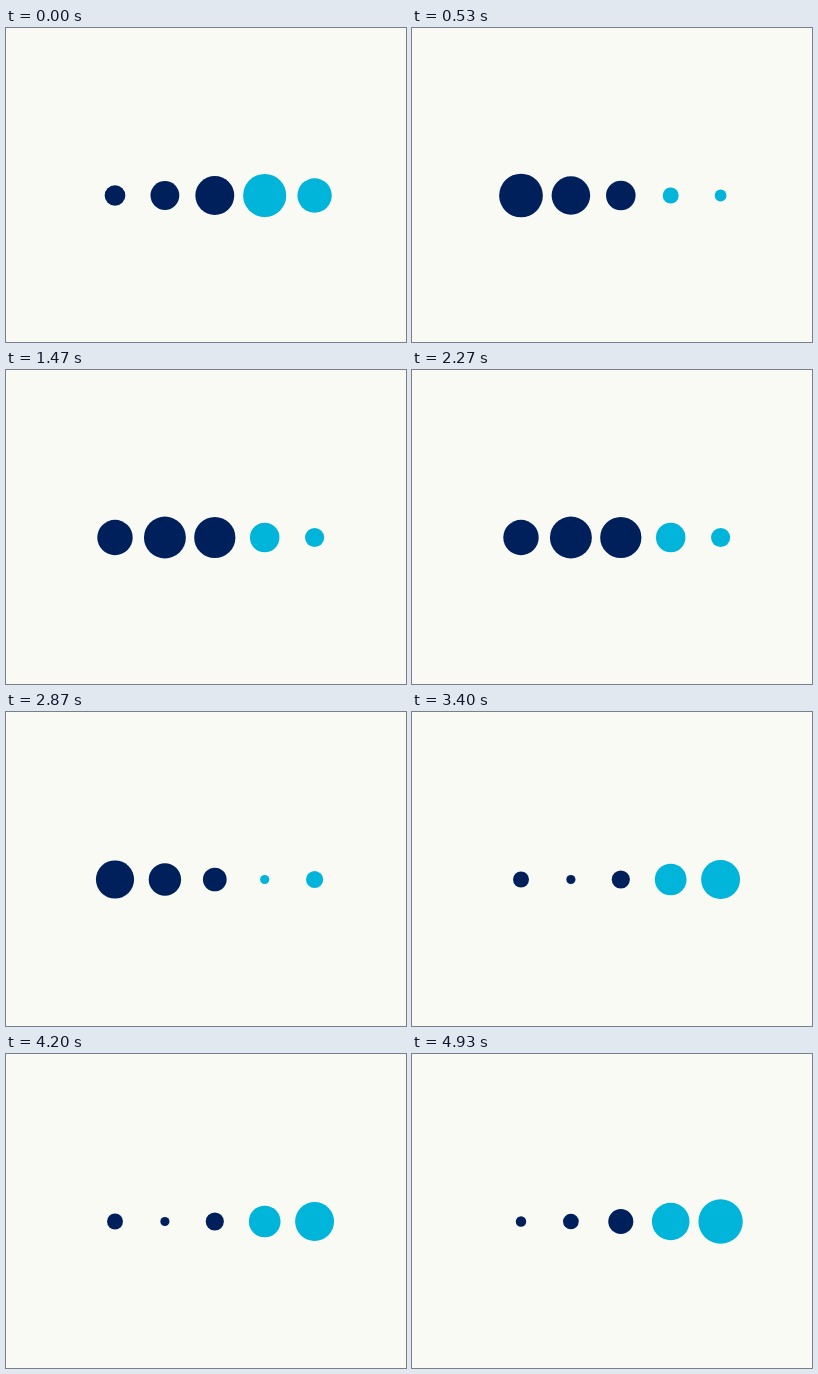
An HTML page that plays this animation: 400 by 314 pixels, repeating every 4990 ms.

```html
<!DOCTYPE html>
<html lang="en">
<head>
<meta charset="utf-8">
<title>Loading dots</title>
<style>
  html, body { margin: 0; width: 100%; height: 100%; overflow: hidden; background: #fafaf5; }
  svg { display: block; width: 400px; height: 314px; }
</style>
</head>
<body>
<svg viewBox="0 0 400 314"></svg>
<script>
const LOOP = 4990;
const STEP = 200 / 3;
const CYCLE = 12; // steps per pulse
const SMALL = 8.5, LARGE = 46.5;
const NAVY = '#00205b', TEAL = '#00b4da';

// low and high: the steps at which a dot is smallest and largest
const dots = [
  { color: NAVY, low: 1.65, high: 8.5 },
  { color: NAVY, low: 3.1, high: 9.3 },
  { color: NAVY, low: 4.4, high: 10.9 },
  { color: TEAL, low: 6.9, high: 12.5 },
  { color: TEAL, low: 8.6, high: 13.6 }
];

const svg = document.querySelector('svg');
dots.forEach((dot, i) => {
  dot.el = document.createElementNS('http://www.w3.org/2000/svg', 'circle');
  dot.el.setAttribute('cx', 109 + 49.9 * i);
  dot.el.setAttribute('cy', 167.5);
  dot.el.setAttribute('fill', dot.color);
  svg.append(dot.el);
});

// grows evenly from low to high, then shrinks evenly until the next low
function diameter({ low, high }, step) {
  const rise = high - low;
  const t = (step - low + CYCLE) % CYCLE;
  const grown = t < rise ? t / rise : (CYCLE - t) / (CYCLE - rise);
  return SMALL + (LARGE - SMALL) * grown;
}

function draw(ms) {
  // steps land on whole hundredths of a second
  const tick = Math.floor((ms % LOOP) / 10) * 10;
  const step = Math.floor((tick + 5) / STEP) % CYCLE;
  for (const dot of dots) dot.el.setAttribute('r', diameter(dot, step) / 2);
}

const start = performance.now();
function loop() {
  draw(performance.now() - start);
  requestAnimationFrame(loop);
}
loop();
</script>
</body>
</html>
```
